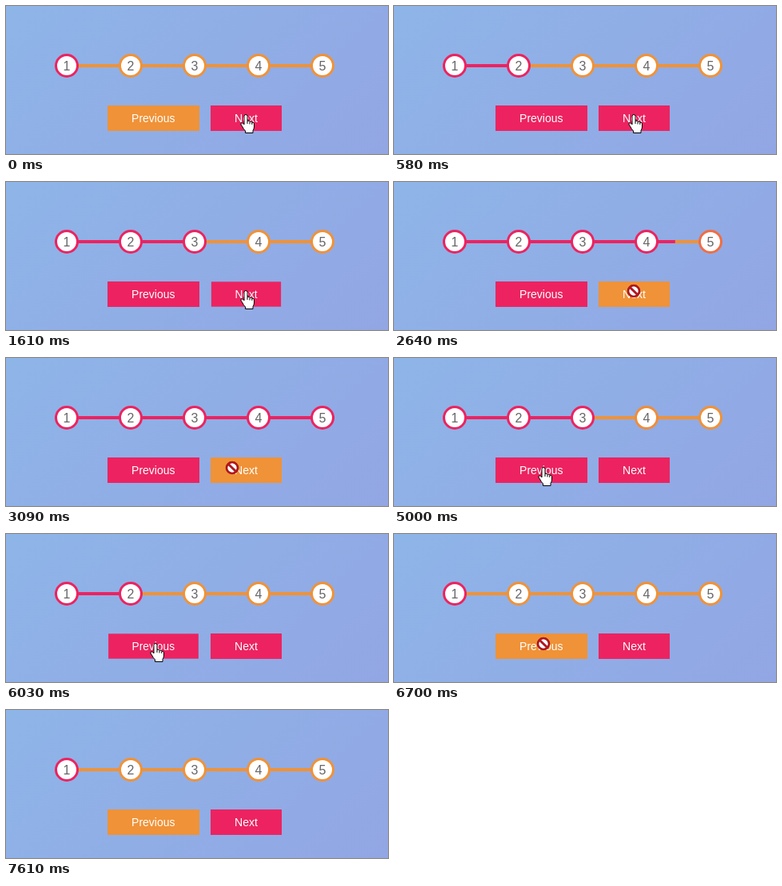
An HTML page for the animation above (8.21 s loop, 478 px wide and 186 px high).

```html
<!DOCTYPE html>
<html lang="en">
<head>
<meta charset="utf-8">
<title>Progress steps</title>
<style>
  html, body { margin: 0; width: 100%; height: 100%; overflow: hidden; }
  body { background: linear-gradient(135deg, #8eb5e8, #92a6e4); }
  svg { display: block; width: 478px; height: 186px; }
  text { font-family: "Liberation Sans", Arial, sans-serif; text-anchor: middle; }
  .num { font-size: 16px; fill: #666; }
  .label { font-size: 14px; fill: #fff; }
</style>
</head>
<body>
<svg id="stage" viewBox="0 0 478 186">
  <rect x="61" y="73" width="350" height="4" fill="#f09237"/>
  <rect id="bar" x="61" y="73" height="4" fill="#ec2360"/>
  <g id="steps"></g>
  <g id="prev"><rect x="127" y="125" width="115" height="32"/><text class="label" x="184.3" y="146">Previous</text></g>
  <g id="next"><rect x="256" y="125" width="89" height="32"/><text class="label" x="300.5" y="146">Next</text></g>
  <g id="cursor">
    <g id="hand" fill="#fff" stroke="#000" stroke-linejoin="round">
      <path d="M-2 2.5Q-2 .5 0 .5Q2 .5 2 2.5V8.5Q4.8 7.5 5 9.3Q7.6 8.5 7.8 10.3Q10.5 9.8 10.5 12V16Q10.5 18 9 20.5V23.5H-.5V21Q-3 18.5 -4 16L-6 13Q-6.6 11.2 -5 10.8Q-3.3 11 -2 13Z"/>
      <path d="M2 8.5V12M5 9.3V12.5M7.8 10.3V13" fill="none"/>
    </g>
    <g id="blocked">
      <circle r="7" fill="#fff" stroke="#7d1018" stroke-width="2.6"/>
      <path d="M-4.6 -4.6L4.6 4.6" stroke="#7d1018" stroke-width="2.8"/>
      <circle r="7" fill="none" stroke="#c8141e" stroke-width="1.4"/>
      <path d="M-4.6 -4.6L4.6 4.6" stroke="#c8141e" stroke-width="1.6"/>
    </g>
    <path id="arrow" d="M.5 .5V16.5L4.2 13L6.8 18.8L9.2 17.7L6.7 12.2H11.8Z" fill="#fff" stroke="#000"/>
  </g>
</svg>
<script>
const LOOP = 8210, EASE_MS = 240, LEAD = 50, HIDE_AT = 7610;
const PINK = [236, 35, 96], ORANGE = [240, 146, 55];
const $ = id => document.getElementById(id);

// press time, release time, button, step reached
const clicks = [
  [30, 330, 'next', 2], [760, 1300, 'next', 3], [1610, 1880, 'next', 4], [2300, 2640, 'next', 5],
  [3300, 3640, 'next', 5],
  [4000, 4210, 'prev', 4], [4550, 4880, 'prev', 3], [5270, 5610, 'prev', 2], [6030, 6360, 'prev', 1],
  [6730, 6880, 'prev', 1], [7000, 7390, 'prev', 1]
];

// time, x, y of the pointer
const path = [
  [0, 300, 137], [2850, 300, 137], [3090, 283, 138], [3640, 283, 138], [3730, 262, 121], [3810, 236, 112],
  [3900, 208, 123], [4000, 194, 133], [4210, 194, 133], [4500, 187, 138], [LOOP, 187, 138]
];

const buttons = {
  prev: { x: 127, w: 115, off: 1 },
  next: { x: 256, w: 89, off: 5 }
};

const mix = (a, b, k) => a + (b - a) * k;
const tint = k => `rgb(${ORANGE.map((c, i) => Math.round(mix(c, PINK[i], k)))})`;

// CSS "ease": cubic-bezier(.25, .1, .25, 1)
function ease(x) {
  if (x >= 1) return 1;
  const bez = (a, b, s) => 3 * a * s * (1 - s) ** 2 + 3 * b * s * s * (1 - s) + s ** 3;
  let lo = 0, hi = 1;
  for (let i = 0; i < 20; i++) {
    const mid = (lo + hi) / 2;
    if (bez(.25, .25, mid) < x) lo = mid; else hi = mid;
  }
  return bez(.1, 1, lo);
}

function add(parent, tag, attrs) {
  const el = document.createElementNS('http://www.w3.org/2000/svg', tag);
  for (const key in attrs) el.setAttribute(key, attrs[key]);
  return parent.appendChild(el);
}

const rings = [1, 2, 3, 4, 5].map(n => {
  const cx = 80 * n - 4;
  const ring = add($('steps'), 'circle', { cx, cy: 75, r: 13.5, fill: '#fff', 'stroke-width': 3 });
  add($('steps'), 'text', { class: 'num', x: cx, y: 80.5 }).textContent = n;
  return ring;
});

function stateAt(t) {
  let from = 1, to = 1, since = -1e4, pressed = null;
  for (const [down, up, name, step] of clicks) {
    if (t >= down && t < up) pressed = name;
    if (t >= up && step !== to) { from = to; to = step; since = up; }
  }
  return { from, to, pressed, k: ease((t - since + LEAD) / EASE_MS) };
}

function pointerAt(t) {
  const i = path.findIndex(p => p[0] > t);
  const [a, b] = [path[i - 1], path[i]];
  const k = (t - a[0]) / (b[0] - a[0]);
  return [mix(a[1], b[1], k), mix(a[2], b[2], k)];
}

function draw(t) {
  const { from, to, pressed, k } = stateAt(t);
  $('bar').setAttribute('width', 350 * (mix(from, to, k) - 1) / 4);
  rings.forEach((ring, i) => ring.setAttribute('stroke', tint(mix(+(i < from), +(i < to), k))));

  const [x, y] = pointerAt(t);
  let shape = 'arrow';
  for (const name in buttons) {
    const b = buttons[name], off = to === b.off, cx = b.x + b.w / 2;
    const scale = pressed === name ? .98 : 1;
    $(name).setAttribute('fill', tint(off ? 0 : 1));
    $(name).setAttribute('transform', `translate(${cx} 141) scale(${scale}) translate(${-cx} -141)`);
    if (x >= b.x && x <= b.x + b.w && y >= 125 && y <= 157) shape = off ? 'blocked' : 'hand';
  }

  $('cursor').setAttribute('transform', `translate(${x} ${y - (shape === 'hand' ? 1 : 0)})`);
  for (const id of ['hand', 'blocked', 'arrow'])
    $(id).style.display = id === shape && t < HIDE_AT ? '' : 'none';
}

const start = performance.now();
function tick() {
  draw((performance.now() - start) % LOOP);
  requestAnimationFrame(tick);
}
tick();
</script>
</body>
</html>
```
